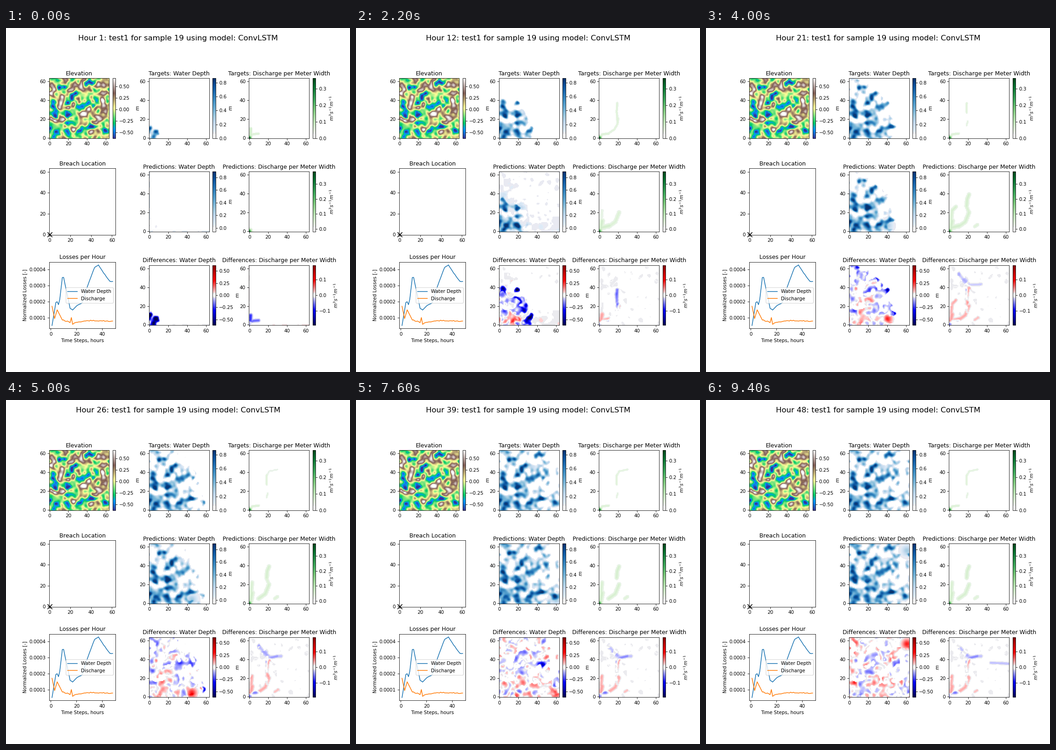
Recreate the animation shown at these times as a matplotlib script. Size 748x748 px, loop 9600 ms.

```python
import numpy as np
import matplotlib.pyplot as plt
from matplotlib.animation import FuncAnimation
from matplotlib.colors import ListedColormap
from mpl_toolkits.axes_grid1 import make_axes_locatable

HOURS = 48
N = 64
X, Y = np.meshgrid(np.arange(N), np.arange(N))
rng = np.random.default_rng(19)

# Key places that shape the otherwise random terrain.
HOLLOWS = [(2, 11), (9, 5), (21, 5), (20, 15), (19, 22), (19, 28), (4, 27),
           (4, 37), (19, 39), (11, 55), (36, 33), (41, 36), (42, 58), (60, 6)]
HILLS = [(3, 50), (21, 50), (12, 40), (12, 34), (25, 35), (33, 24), (39, 27),
         (12, 20), (24, 10), (57, 48), (55, 42), (34, 58), (56, 56)]


def bump(x, y, sx, sy=None):
    return np.exp(-((X - x) / sx) ** 2 / 2 - ((Y - y) / (sy or sx)) ** 2 / 2)


def smooth_noise(scale):
    freq = np.fft.fftfreq(N)
    low_pass = np.exp(-2 * (np.pi * scale) ** 2 * (freq[:, None] ** 2 + freq ** 2))
    field = np.fft.ifft2(np.fft.fft2(rng.standard_normal((N, N))) * low_pass).real
    return field / field.std()


def terrain(spread=2.6):
    """Random hills, bent to pass through the key places."""
    base = .02 + .25 * smooth_noise(1.7)
    pins = np.array(HOLLOWS + HILLS)
    goal = np.repeat([-.5, .56], [len(HOLLOWS), len(HILLS)])
    gap = ((pins[:, None] - pins) ** 2).sum(2)
    kernel = np.exp(-gap / (2 * spread ** 2)) + .05 * np.eye(len(pins))
    weights = np.linalg.solve(kernel, goal - base[pins[:, 1], pins[:, 0]])
    return np.clip(base + sum(w * bump(x, y, spread) for w, (x, y) in zip(weights, pins)),
                   -.63, .685)


def stroke(width, *pts):
    """Soft line along a polyline."""
    best = np.full((N, N), 1e9)
    for (x0, y0), (x1, y1) in zip(pts, pts[1:]):
        dx, dy = x1 - x0, y1 - y0
        s = np.clip(((X - x0) * dx + (Y - y0) * dy) / (dx * dx + dy * dy), 0, 1)
        best = np.minimum(best, (X - x0 - s * dx) ** 2 + (Y - y0 - s * dy) ** 2)
    return np.exp(-best / width ** 2)


ELEVATION = terrain()
NOISE_A, NOISE_B, SPECKS = (smooth_noise(1.7) for _ in range(3))
# The flood spreads from the corner, sooner through low ground.
ARRIVAL = 8 * (np.hypot(1.25 * X, Y) / 34) ** 1.6 + 4 * ELEVATION
CORNER = np.exp(-(X ** 2 + Y ** 2) / 5)
EDGE = (X < 1) | (Y < 1)
BLOCK = ((X < 16) & (Y < 56)) | (Y < 16)

# Each flow: shape, strength, hour it appears, hour it dries up.
ALWAYS = 99
TARGET_FLOWS = [
    (stroke(1.7, (1, 0), (1.5, 10)), .085, -2, 10),
    (stroke(1.7, (0, 1), (4, 4), (10, 4.5)), .03, -2, 5),
    (stroke(1.6, (0, 1), (4, 4), (10, 4.5)), .06, -2, ALWAYS),
    (stroke(1.7, (10, 5), (16, 9), (19.5, 15), (20, 21)), .06, 4, 13),
    (stroke(1.4, (18.5, 13), (19.5, 18)), .045, 9, ALWAYS),
    (stroke(1.6, (19.5, 16), (18.5, 28), (19, 37)), .055, 7, 18),
    (stroke(1.5, (18.5, 27), (18.5, 37)), .055, 12, ALWAYS),
    (stroke(1.5, (18.5, 36), (21, 41), (30, 43)), .048, 25, ALWAYS),
    (stroke(2, (10, 54), (15, 48), (22, 42), (34, 43)), .024, 20, ALWAYS),
    (stroke(1.8, (44, 36), (63, 35)), .024, 40, ALWAYS),
]
PREDICTED_FLOWS = [
    (stroke(2.4, (1, 1), (3, 11)), .06, 5, ALWAYS),
    (stroke(2.2, (3, 4), (11, 6)), .06, 5, 25),
    (stroke(1.9, (2, 12), (3, 22)), .05, 12, ALWAYS),
    (stroke(1.8, (3, 22), (7, 26)), .055, 13, 23),
    (stroke(2, (10, 5), (17, 10), (21, 20)), .055, 11, ALWAYS),
    (stroke(1.7, (21, 20), (18, 27)), .05, 13, 27),
    (stroke(1.9, (18.5, 27), (19, 34), (21, 39)), .058, 19, ALWAYS),
    (stroke(1.7, (27, 5), (30, 7)), .042, 18, ALWAYS),
]


def pulse(hour, start, end, fade=3):
    return np.clip((hour - start) / fade + .5, 0, 1) * np.clip((end - hour) / fade + .5, 0, 1)


def total_flow(flows, hour, corner):
    return np.maximum.reduce([corner * CORNER] + [
        size * pulse(hour, start, end) * shape for shape, size, start, end in flows])


def flood(hour):
    age = np.clip(hour - ARRIVAL, 0, None)
    level = .24 - .0045 * ARRIVAL - .25 * np.exp(-age / 4)
    return 1.05 * np.clip(level - ELEVATION, 0, .8) * np.clip(age, 0, 1)


def drift(hour, hours, xs, ys):
    return np.interp(hour, hours, xs), np.interp(hour, hours, ys)


def depth_fields(hour, noise):
    target = flood(hour)
    # the model runs late at first, then catches up
    pred = flood(hour - 4.5 * np.exp(-((hour - 10) / 12) ** 2))
    wet = np.clip(np.maximum(target, pred) / .08, 0, 1)
    pred = pred + .075 * noise * wet * min(hour / 12, 1)
    early = np.exp(-((hour - 9) / 4) ** 2)
    pred = pred + early * (.05 * np.clip(SPECKS - .7, 0, 1) + .05 * BLOCK * (noise > -.2))
    pred = pred + .06 * EDGE * (noise > .3) * np.exp(-hour / 4)
    # one spot of too little water and one of too much wander with the flood
    growth = pulse(hour, 6, ALWAYS, 6)
    dry = drift(hour, (16, 31, 48), (20, 36, 52), (40, 33, 35))
    high = drift(hour, (8, 21, 31, 40, 48), (6, 40, 50, 61, 61), (6, 6, 2, 4, 56))
    pred = pred + growth * (.28 * bump(*high, 3.5) - .28 * bump(*dry, 5, 2.5))
    return target, np.clip(pred, 0, .88)


def flow_fields(hour, noise):
    pred = total_flow(PREDICTED_FLOWS, hour, .3)
    # a trickle too weak to show on its own map
    target = np.maximum(total_flow(TARGET_FLOWS, hour, .34), .42 * pred)
    stray = .012 * np.sign(noise) * np.clip(SPECKS - .6, 0, 1) * pulse(hour, 6, ALWAYS, 6)
    edge = .02 * EDGE * (noise > .3) * np.exp(-hour / 4)
    return target, pred, pred - target + stray + edge


def sequential(name, tint):
    """Colormap with a white floor and a pale rim."""
    colors = plt.get_cmap(name)(np.linspace(0, 1, 256))
    colors[:19] = 1
    colors[19:27, :3] = tint
    return ListedColormap(colors)


def diverging():
    colors = plt.get_cmap("seismic")(np.linspace(0, 1, 256))
    colors[118:138, :3] = (.922, .922, .938)
    colors[123:133] = 1
    return ListedColormap(colors)


BLUES = sequential("Blues", (.915, .92, .95))
GREENS = sequential("Greens", (.92, .955, .92))
SEISMIC = diverging()
DEPTH_UNIT = "$m$"
FLOW_UNIT = "$m^3s^{-1}m^{-1}$"

fig, axes = plt.subplots(3, 3, figsize=(10, 10), dpi=74.8,
                         gridspec_kw=dict(wspace=.5, hspace=.2))


def panel(ax, title, unit, cmap, low, high):
    image = ax.imshow(np.zeros((N, N)), cmap=cmap, vmin=low, vmax=high, origin="lower")
    ax.set_title(title)
    cax = make_axes_locatable(ax).append_axes("right", size="5%", pad=.1)
    fig.colorbar(image, cax=cax).set_label(unit)
    return image


panel(axes[0, 0], "Elevation", DEPTH_UNIT, "terrain", -.63, .685).set_data(ELEVATION)
images = [
    panel(axes[0, 1], "Targets: Water Depth", DEPTH_UNIT, BLUES, 0, .863),
    panel(axes[1, 1], "Predictions: Water Depth", DEPTH_UNIT, BLUES, -.063, .891),
    panel(axes[2, 1], "Differences: Water Depth", DEPTH_UNIT, SEISMIC, -.623, .623),
    panel(axes[0, 2], "Targets: Discharge per Meter Width", FLOW_UNIT, GREENS, 0, .3644),
    panel(axes[1, 2], "Predictions: Discharge per Meter Width", FLOW_UNIT, GREENS, -.019, .381),
    panel(axes[2, 2], "Differences: Discharge per Meter Width", FLOW_UNIT, SEISMIC, -.19, .19),
]

breach = axes[1, 0]
breach.set(title="Breach Location", xlim=(-.5, 63.5), ylim=(-.5, 63.5), aspect="equal")
breach.scatter(0, 0, s=100, c="k", marker="x", clip_on=False, zorder=5)


def loss_curve(keys, jitter):
    """Losses through (hour, value in 1e-5) key points."""
    hours = np.arange(1, HOURS + 1)
    wobble = jitter * rng.uniform(-1, 1, HOURS) * (hours > 9)
    return hours, 1e-5 * (np.interp(hours, *zip(*keys)) + wobble)


losses = axes[2, 0]
losses.plot(*loss_curve([(1, 5.3), (4, 19.6), (5, 20), (6, 18.2), (7, 21.5), (9, 35), (10, 35),
                         (15, 16.1), (17, 15), (20, 17.5), (24, 19), (30, 33), (34, 41.2),
                         (37, 42.8), (41, 37.8), (46, 32.5), (48, 32.5)], .15),
            label="Water Depth")
losses.plot(*loss_curve([(1, 17.2), (3, 9.6), (5, 15), (9, 8.7), (15, 7.3), (16, 10), (17, 6.2),
                         (21, 7.4), (31, 8.3), (40, 8.2), (48, 7.9)], .3),
            label="Discharge")
losses.set(title="Losses per Hour", xlabel="Time Steps, hours", ylabel="Normalized Losses [-]")
losses.set_box_aspect(1)
losses.legend(loc="center right")

heading = fig.suptitle("", fontsize=16)


def update(frame):
    hour = frame + 1
    heading.set_text(f"Hour {hour}: test1 for sample 19 using model: ConvLSTM")
    noise = NOISE_A * np.cos(hour / 9) + NOISE_B * np.sin(hour / 9)
    depth, depth_pred = depth_fields(hour, noise)
    fields = (depth, depth_pred, depth_pred - depth, *flow_fields(hour, noise))
    for image, field in zip(images, fields):
        image.set_data(field)
    return [heading, *images]


anim = FuncAnimation(fig, update, frames=HOURS, interval=200, repeat=True, repeat_delay=0)
plt.show()
```
